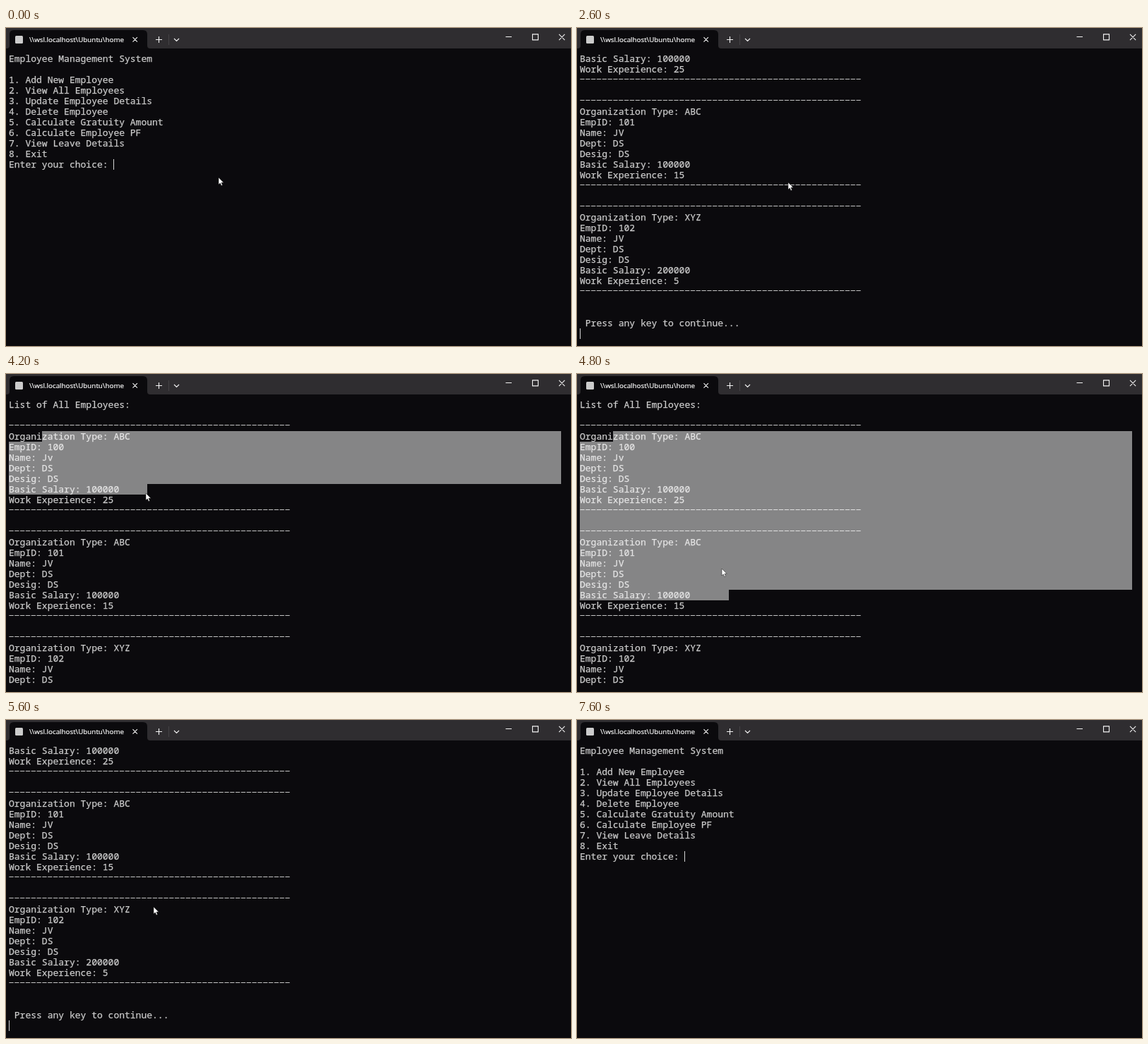
Recreate the animation shown at these times as an HTML page. Size 800 by 451 pixels, loop 8000 ms.

```html
<!DOCTYPE html>
<html lang="en">
<head>
<meta charset="utf-8">
<title>Terminal</title>
<style>
  html, body { margin: 0; width: 100%; height: 100%; overflow: hidden; background: #0b0a0d; }
  svg { display: block; width: 100vw; height: 100vh; }
  #rows text {
    font: 13.03px "Noto Sans Mono", monospace; white-space: pre;
    fill: #ccc; stroke: #ccc; stroke-width: .25;
  }
  .title { font: 9.8px "Open Sans", "Noto Sans", sans-serif; fill: #fff; stroke: #fff; stroke-width: .2; }
  .icon { fill: none; stroke: #f4f4f4; stroke-width: 1.1; }
</style>
</head>
<body>
<svg viewBox="0 0 800 451" preserveAspectRatio="none">
  <rect width="800" height="451" fill="#0b0a0d"/>
  <rect width="800" height="29" fill="#2f2d30"/>
  <path d="M1 29Q5 29 5 25V9Q5 3 11 3H194Q200 3 200 9V25Q200 29 204 29Z" fill="#0b0a0d"/>
  <rect x="13" y="11" width="11" height="11" rx="1.5" fill="#ccc"/>
  <text class="title" x="33" y="20">\\wsl.localhost\Ubuntu\home</text>
  <path class="icon" d="M179.5 13.2l6.4 6.4m0-6.4l-6.4 6.4M212 16.5h9m-4.5-4.5v9M238 15l3.5 3.5 3.5-3.5"/>
  <path d="M230.5 9v15" stroke="#454346"/>
  <path class="icon" d="M707.5 12.5h8.5M745.5 8.9h8v8h-8zM783 8.9l8.2 8.2m0-8.2l-8.2 8.2"/>
  <g id="rows"></g>
  <path id="rules" fill="none" stroke="#c4c4c4" stroke-width="1.2" stroke-dasharray="6.3 1.52"/>
  <path id="selection" fill="#fff" fill-opacity=".5"/>
  <rect id="caret" width="1" height="15" fill="#d4d4d4"/>
  <path id="pointer" d="M0 0V10L2.3 7.9 3.8 11.6 5.5 10.9 4 7.3H7.2Z"
        fill="#fff" stroke="#111" stroke-width=".5"/>
</svg>
<script>
const LOOP = 8000, STEP = 200, BLINK = 600;
const LEFT = 4, TOP = 36, CELL = 7.82, LINE = 15, ROWS = 27, RIGHT = 786;
const TYPED = 600, LISTED = 1600, DRAG = 3600, RELEASE = 4600, CLICK = 5200, CLOSED = 7200;
const RULE = "-".repeat(51);
const $ = id => document.getElementById(id);
const clamp = (value, low, high) => Math.min(high, Math.max(low, value));

const menu = [
  "Employee Management System", "",
  ...["Add New Employee", "View All Employees", "Update Employee Details", "Delete Employee",
    "Calculate Gratuity Amount", "Calculate Employee PF", "View Leave Details", "Exit"]
    .map((item, i) => `${i + 1}. ${item}`),
  "Enter your choice: "
];

const record = (org, id, name, salary, years) => [
  "", RULE, `Organization Type: ${org}`, `EmpID: ${id}`, `Name: ${name}`, "Dept: DS", "Desig: DS",
  `Basic Salary: ${salary}`, `Work Experience: ${years}`, RULE
];

const list = [
  "List of All Employees:",
  ...record("ABC", 100, "Jv", 100000, 25),
  ...record("ABC", 101, "JV", 100000, 15),
  ...record("XYZ", 102, "JV", 200000, 5),
  "", "", " Press any key to continue...", ""
];
const MAX_SCROLL = list.length - ROWS;

const rows = Array.from({ length: ROWS }, (_, i) => {
  const row = document.createElementNS("http://www.w3.org/2000/svg", "text");
  row.setAttribute("x", LEFT);
  row.setAttribute("y", TOP + 12 + i * LINE);
  return $("rows").appendChild(row);
});

const cellX = col => LEFT + col * CELL;
const rowY = row => TOP + row * LINE;

// Wheel turns move three lines at a time, one notch every 300 ms.
function scrollAt(t) {
  if (t < 2800) return MAX_SCROLL;
  return clamp(3 * Math.floor((t - 4700) / 300), 0, MAX_SCROLL);
}

// Blinking restarts whenever the user types or clicks.
function caretOn(t) {
  const start = [CLICK, 1400, TYPED, -200].find(reset => t >= reset);
  return Math.floor((t - start) / BLINK) % 2 === 0;
}

// Main points of the pointer's path: time, x, y.
const path = [
  [2800, 299, 219], [DRAG, 50, 84], [4200, 198, 169], [RELEASE, 214, 312],
  [4800, 205, 276], [CLICK, 210, 262], [5600, 209, 265]
];
function pointerAt(t) {
  if (t < TYPED) return [301, 212];
  t = clamp(t, path[0][0], path[path.length - 1][0]);
  const i = Math.max(1, path.findIndex(point => point[0] >= t));
  const [t0, x0, y0] = path[i - 1], [t1, x1, y1] = path[i];
  const k = (t - t0) / (t1 - t0);
  return [x0 + (x1 - x0) * k, y0 + (y1 - y0) * k];
}

function cellAt(t) {
  const [x, y] = pointerAt(t);
  return { row: Math.floor((y - TOP) / LINE), col: Math.round((x - LEFT) / CELL) };
}

function selectionPath(t, scroll) {
  if (t <= DRAG || t >= CLICK) return "";
  const start = cellAt(DRAG), end = cellAt(Math.min(t, RELEASE));
  let d = "";
  for (let r = start.row; r <= end.row; r++) {
    const x = Math.round(r === start.row ? cellX(start.col) : LEFT);
    const right = Math.round(r === end.row ? cellX(end.col) : RIGHT);
    d += `M${x} ${rowY(r - scroll)}H${right}v${LINE}H${x}Z`;
  }
  return d;
}

function draw(t) {
  const inList = t >= LISTED && t < CLOSED;
  const scroll = inList ? scrollAt(t) : 0;
  const lines = inList ? list : menu.slice();
  const last = lines.length - 1, caretRow = last - scroll;
  if (t >= TYPED && t < LISTED) lines[last] += "2";

  let rules = "";
  rows.forEach((row, i) => {
    const line = lines[i + scroll] || "";
    const isRule = line === RULE;
    row.textContent = isRule ? "" : line;
    if (isRule) rules += `M${LEFT + .4} ${rowY(i) + 6.5}H${cellX(RULE.length)}`;
  });
  $("rules").setAttribute("d", rules);
  $("selection").setAttribute("d", selectionPath(t, scroll));

  const pointing = t < TYPED || (t >= 2400 && t < 7000);
  $("pointer").style.display = pointing ? "" : "none";
  $("pointer").setAttribute("transform", `translate(${pointerAt(t)})`);

  $("caret").style.display = caretOn(t) && caretRow < ROWS ? "" : "none";
  $("caret").setAttribute("x", Math.floor(cellX(lines[last].length)));
  $("caret").setAttribute("y", rowY(caretRow));
}

const began = performance.now();
let shown = -1;
function tick() {
  const t = Math.floor((performance.now() - began) % LOOP / STEP) * STEP;
  if (t !== shown) draw(shown = t);
  requestAnimationFrame(tick);
}
tick();
</script>
</body>
</html>
```
